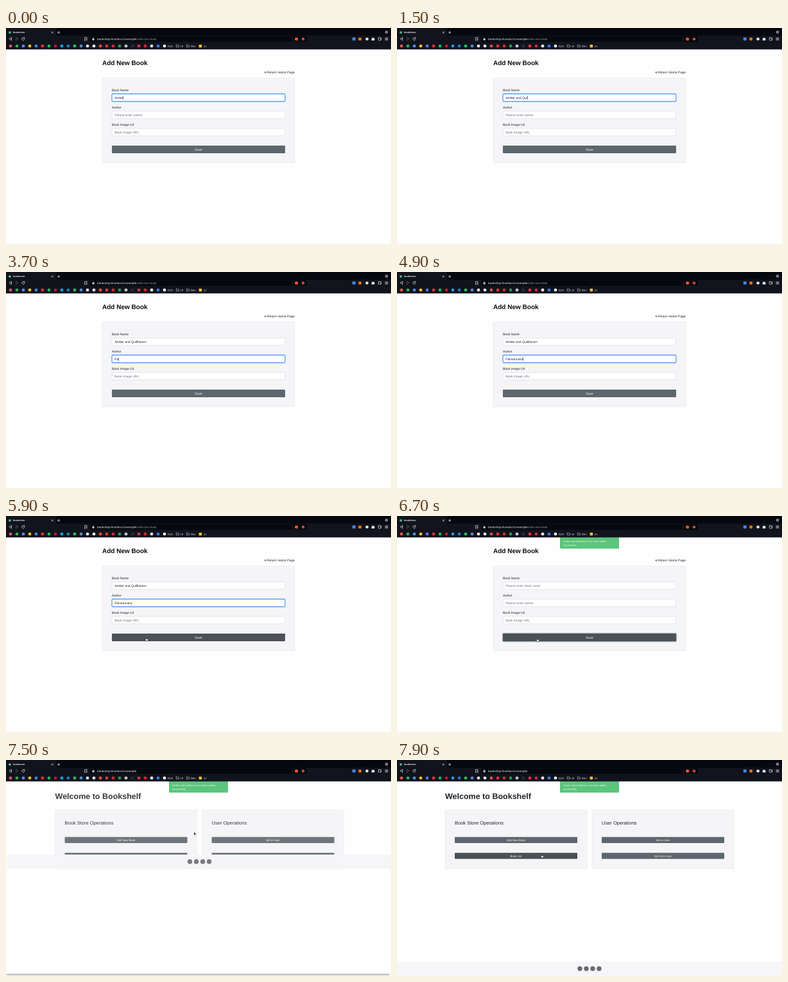
Animation of 600x338 px, one loop 8000 ms. Source, as an HTML page:

```html
<!DOCTYPE html>
<html lang="en">
<head>
<meta charset="utf-8">
<title>bookstore</title>
<style>
  html, body { margin: 0; width: 100%; height: 100%; overflow: hidden; background: #fefefe; }
  svg { display: block; width: 600px; height: 338px; }
  text { font: 5px "Liberation Sans", Arial, sans-serif; fill: #212529; text-rendering: geometricPrecision; white-space: pre; }
  .h1 { font-size: 10px; font-weight: 700; fill: #0b0c0e; }
  .h0 { font-size: 12.5px; font-weight: 700; }
  .h4 { font-size: 7.5px; }
  .card { fill: #f5f5f8; stroke: #dcdce0; stroke-width: .4; }
  .box { fill: #fff; stroke: #ccd1d6; stroke-width: .5; }
  .ring { fill: none; stroke: #5aa5fa; stroke-width: 1.3; }
  .hint { fill: #6c757d; }
  .btn { fill: #5c666d; }
  .btn.hot { fill: #4a5258; }
  .label { fill: #fff; text-anchor: middle; }
  .ui { fill: #e8e8ec; font-size: 4.75px; }
  .line { fill: none; stroke: #d8d8dc; stroke-width: .8; stroke-linecap: round; stroke-linejoin: round; }
</style>
</head>
<body>
<svg viewBox="0 0 600 338" xmlns="http://www.w3.org/2000/svg">
  <rect width="600" height="338" fill="#fefefe"/>

  <g id="form">
    <text class="h1" x="150" y="58.2">Add New Book</text>
    <path d="M406.3 69.4H403M404.6 67.7L402.9 69.4L404.6 71.1" fill="none" stroke="#212529" stroke-width=".6"/>
    <text x="407" y="70.8">Return Home Page</text>
    <path id="under" d="M407 71.6H450" stroke="#212529" stroke-width=".35"/>
    <rect class="card" x="150" y="78" width="300" height="133" rx="1"/>
    <g id="fields"></g>
    <rect id="saveRing" x="164.4" y="183.4" width="271.2" height="13.2" rx="1.8" fill="none" stroke="#a9aeb3" stroke-width="1.2"/>
    <g id="save"></g>
  </g>

  <g id="home">
    <text class="h0" x="75" y="60.5">Welcome to Bookshelf</text>
    <g id="cards"></g>
    <g id="footer">
      <rect width="600" height="22" fill="#f6f5f8"/>
      <g id="social" fill="#6b6c70"></g>
    </g>
  </g>
  <g id="scroll">
    <rect y="333.5" width="600" height="4.5" fill="#fafafa"/>
    <rect x="1" y="334.6" width="597" height="2.4" rx="1.2" fill="#c1c1c1"/>
  </g>

  <g id="toast">
    <rect x="254" y="33" width="92" height="18" rx=".8" fill="#5bc57c"/>
    <g style="opacity:.85">
      <text x="259" y="41.2" style="font-size:3.9px;fill:#fff">Amber and Quillhaven has been added</text>
      <text x="259" y="46.6" style="font-size:3.9px;fill:#fff">successfully</text>
    </g>
  </g>

  <g id="chrome">
    <rect width="600" height="33.5" fill="#11131d"/>
    <rect x="78" width="522" height="12" fill="#07080f"/>
    <circle cx="6" cy="7" r="2" fill="#41b883"/>
    <text class="ui" x="11" y="8.4" style="font-size:3.8px;font-weight:700">bookstore</text>
    <path class="line" d="M71.2 5.9L73.4 8.1M73.4 5.9L71.2 8.1M80.3 7H83.9M82.1 5.2V8.8" stroke-width=".6"/>
    <circle cx="593" cy="6.6" r="2.4" fill="#8d8e96"/>
    <path d="M591.9 6.1L593 7.3L594.1 6.1" fill="none" stroke="#07080f" stroke-width=".6"/>
    <path class="line" d="M8.6 15V19.4L5.4 17.2Z"/>
    <path class="line" d="M15.6 15V19.4L18.8 17.2Z" style="stroke:#55565e"/>
    <path class="line" d="M28.6 15.8A2.1 2.1 0 1 0 29 17.6M28.8 14.8V16H27.6"/>
    <path class="line" d="M123 14.9H126V19.5L124.5 18.2L123 19.5Z"/>
    <rect x="131" y="12.8" width="338" height="8.8" rx="1.2" fill="#07080f"/>
    <path d="M446.5 14V20.4" stroke="#3a3b44" stroke-width=".5"/>
    <rect x="134.6" y="16.7" width="3" height="2.5" rx=".3" fill="#d8d8dc"/>
    <path class="line" d="M135.2 16.6V15.9A.9.9 0 0 1 137 15.9V16.6" style="stroke-width:.5"/>
    <text class="ui" x="142" y="18.9">bookshop-ilvonka.tir.example<tspan id="path" fill="#8b8c95">/add-new-book</tspan></text>
    <circle cx="452.6" cy="17.2" r="2.5" fill="#fb542b"/>
    <circle cx="463" cy="17.2" r="2.2" fill="#c8503c"/>
    <rect x="539.8" y="14.8" width="4.8" height="4.8" rx=".6" fill="#4a86e0"/>
    <circle cx="551.6" cy="17.2" r="2.5" fill="#e2761b"/>
    <circle cx="562.6" cy="17.2" r="2.3" fill="#e4e4e8"/>
    <path d="M569.8 15.8H571.2A.9.9 0 0 1 573 15.8H574.2V17A.9.9 0 0 1 574.2 18.6V19.6H569.8Z" fill="#e4e4e8"/>
    <rect class="line" x="580.3" y="15.3" width="4.4" height="3.9" rx=".6"/>
    <path class="line" d="M583.3 17.2H584.6M591 15.6H595M591 17.2H595M591 18.8H595"/>
    <g id="marks"></g>
  </g>

  <g id="beam" fill="none" stroke="#222" stroke-width=".6"><path d="M-1.1-2.8Q0-2.8 0-2V2Q0 2.8-1.1 2.8M1.1-2.8Q0-2.8 0-2V2Q0 2.8 1.1 2.8"/></g>
  <g id="arrow"><path d="M-.5-2.5V2.7L.7 1.6L1.5 3.3L2.3 2.9L1.5 1.3H3Z" fill="#111" stroke="#fff" stroke-width=".4"/></g>
  <g id="hand"><path d="M-.8-2.6Q-.3-3 .1-2.6V-.8L2-.4Q2.5-.2 2.4.4L1.9 2.6H-.6L-2-.1Q-2-.8-1.3-.6L-.8 0Z" fill="#fff" stroke="#111" stroke-width=".55"/></g>
</svg>

<script>
const $ = id => document.getElementById(id);
const clamp = v => Math.max(0, Math.min(1, v));
const show = (id, on) => { $(id).style.display = on ? '' : 'none'; };
const shift = (id, x, y) => $(id).setAttribute('transform', `translate(${x} ${y})`);

const TITLE = 'Amber and Quillhaven', AUTHOR = 'Palvetunska';
const HINTS = ['Please enter book name', 'Please enter author', 'Book Image URL'];

const button = (x, y, w, h, label, size, id = '') =>
  `<rect class="btn" id="${id}" x="${x}" y="${y}" width="${w}" height="${h}" rx="1"/>
   <text class="label" x="${x + w / 2}" y="${y + h / 2 + size * .35}" style="font-size:${size}px">${label}</text>`;

$('fields').innerHTML = ['Book Name', 'Author', 'Book Image Url'].map((name, i) => {
  const y = 109 + 27 * i;
  return `<text x="165" y="${y - 10.3}">${name}</text>
    <rect class="box" x="165.2" y="${y - 5.8}" width="269.6" height="11.6" rx="1.2"/>
    <rect class="ring" id="ring${i}" x="165" y="${y - 6}" width="270" height="12" rx="1.4"/>
    <text id="val${i}" x="169.2" y="${y + 1.8}"></text>
    <rect id="caret${i}" y="${y - 2.8}" width=".5" height="5.6" fill="#111"/>`;
}).join('');

$('save').innerHTML = button(165, 184, 270, 12, 'Save', 5, 'saveBtn');

$('cards').innerHTML = [
  [75, 'Book Store Operations', 'Add New Book', 'Book List', 'list'],
  [304, 'User Operations', 'Set to User', 'Get from User', 'get']
].map(([x, head, a, b, id]) =>
  `<rect class="card" x="${x}" y="78.4" width="221" height="91.6" rx="1"/>
   <text class="h4" x="${x + 15}" y="100.8">${head}</text>
   ${button(x + 15, 120.5, 191, 9.6, a, 4.375)}${button(x + 15, 145.2, 191, 9.6, b, 4.375, id)}`
).join('');

$('social').innerHTML = [285, 295, 305, 315].map(x => `<circle cx="${x}" cy="11" r="3.7"/>`).join('');

const tints = ('d95a4e 3aa757 4a8af4 e8b93a 4a80d0 e03030 1db954 b81d24 1d9bf0 2a78c0 25c05e 4a90c8 ' +
  'e0e0e4 e8e8ec e0523c d83a34 d02c30 2a9a4a c8c8cc 2a2b33 d83440 d02838 e8e8ec 3a7ae0 e8e8ec').split(' ');
const folder = x => `<path class="line" style="stroke-width:.6" d="M${x - 1.8} 26.4h1.4l.5.6h1.9v2.8h-3.8z"/>`;
$('marks').innerHTML =
  tints.map((c, i) => `<circle cx="${7 + 10 * i}" cy="28.2" r="2.4" fill="#${c}"/>`).join('') +
  folder(267.5) + folder(283.5) + '<rect x="300.6" y="25.9" width="4.6" height="4.6" rx=".5" fill="#f2bd3a"/>' +
  [[252, 'KLD'], [272, 'UI'], [288, 'Dev'], [308, 'cv']]
    .map(([x, s]) => `<text class="ui" x="${x}" y="29.8" style="font-size:4.3px">${s}</text>`).join('');

// Pointer stops: time, x, y
const stops = [
  [2700, 231, 113], [2900, 229, 134], [3300, 229, 136], [5000, 229, 137], [5200, 228, 140],
  [5800, 219, 193], [6700, 219, 194], [7100, 424, 70], [7200, 420, 70],
  [7500, 293.5, 115], [7800, 226, 150], [8000, 226, 151]
];

function pointer(t) {
  const i = stops.findIndex(s => s[0] > t);
  if (i < 1) return stops[0].slice(1);
  const [a, b] = [stops[i - 1], stops[i]];
  const p = (t - a[0]) / (b[0] - a[0]), e = p * p * (3 - 2 * p);
  return [a[1] + (b[1] - a[1]) * e, a[2] + (b[2] - a[2]) * e];
}

function field(i, value, ring, caret) {
  const el = $('val' + i);
  const s = value || HINTS[i];
  if (el.textContent !== s) el.textContent = s;
  el.setAttribute('class', value ? '' : 'hint');
  $('ring' + i).style.opacity = ring;
  show('caret' + i, caret);
  if (caret) $('caret' + i).setAttribute('x', 169.3 + (value ? el.getComputedTextLength() : 0));
}

function draw(t) {
  const atHome = t >= 7250, sent = t >= 6300;
  const [x, y] = pointer(t);
  const seen = t >= 2700 && t < 3300 || t >= 5000;
  const within = (l, r, top, low) => seen && x > l && x < r && y > top && y < low;

  // Form
  const toAuthor = clamp((t - 2890) / 150), toSave = clamp((t - 6090) / 150);
  const typed = TITLE.slice(0, 4 + Math.floor(t * .006 + 1e-6));
  const name = AUTHOR.slice(0, Math.max(0, Math.floor((t - 3290) / 145)));
  const blink = from => t < from || Math.floor((t - from) / 500) % 2 === 0;
  field(0, sent ? '' : typed, 1 - toAuthor, t < 2890);
  field(1, sent ? '' : name, toAuthor * (1 - toSave), t >= 2890 && t < 6090 && blink(4950));
  field(2, '', 0, false);
  const onSave = !atHome && within(165, 435, 184, 196);
  $('saveBtn').classList.toggle('hot', onSave);
  $('saveRing').style.opacity = toSave;
  const onLink = !atHome && within(402, 450, 65, 73);
  show('under', onLink);
  show('form', !atHome);
  $('form').style.opacity = 1 - clamp((t - 7100) / 150);

  // Home page slides in, its footer drops once settled
  const settled = t >= 7600;
  const q = 1 - clamp((t - 7230) / 400), fade = settled ? 1 : 1 - q * q;
  show('home', atHome);
  show('scroll', atHome && !settled);
  $('home').style.opacity = fade;
  shift('home', 15 * (1 - fade), 0);
  shift('footer', 0, settled ? 315.5 : 148);
  const onList = settled && within(90, 281, 145, 155);
  $('list').classList.toggle('hot', onList);
  show('path', !atHome);

  const rise = clamp((t - 6250) / 250);
  show('toast', rise > 0);
  $('toast').style.opacity = rise;
  shift('toast', 0, -18 * (1 - rise) ** 2);

  // Pointer shape follows what lies under it
  const onField = !atHome && [109, 136, 163].some(c => within(165, 435, c - 6, c + 6));
  const onButton = onSave || onLink || onList || settled && within(90, 281, 120, 130);
  const shape = !seen ? '' : onField ? 'beam' : onButton ? 'hand' : 'arrow';
  for (const id of ['beam', 'arrow', 'hand']) {
    show(id, id === shape);
    shift(id, x, y);
  }
}

const start = performance.now();
function tick() {
  const t = (performance.now() - start) % 8000;
  draw(Math.floor(t / 100) * 100);
  requestAnimationFrame(tick);
}
tick();
</script>
</body>
</html>
```
